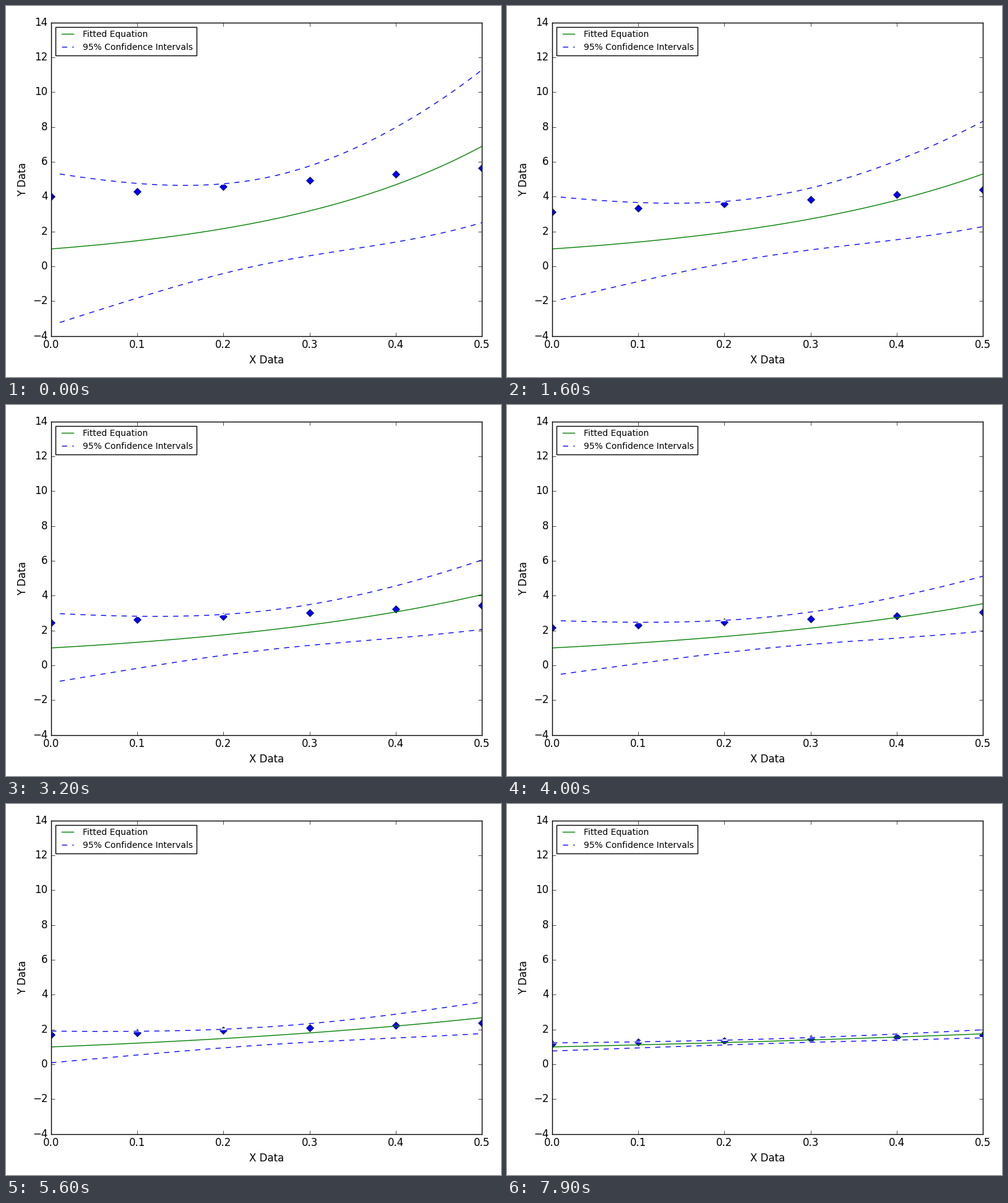
Write a matplotlib script that moves like this. It is 800x600 px and loops after 8000 ms.

```python
import numpy as np
import matplotlib.pyplot as plt
from matplotlib.animation import FuncAnimation

FRAMES = 80
STEP_MS = 100
T_95 = 2.5706  # two-sided 95 %, five degrees of freedom

plt.style.use("classic")
plt.rcParams.update({
    "font.family": "DejaVu Sans",
    "figure.facecolor": "white",
    "savefig.facecolor": "white",
    "savefig.dpi": 100,
})

x_data = np.linspace(0, 0.5, 6)
x_model = np.linspace(0, 0.5, 51)


def fit_rate(y):
    """Least-squares rate b of exp(b * x), by Gauss-Newton steps."""
    b = 2.0
    for _ in range(60):
        f = np.exp(b * x_data)
        slope = x_data * f
        b += slope @ (y - f) / (slope @ slope)
    return b


def half_width(residuals):
    """Half width of the confidence band along x_model."""
    mean = x_data.mean()
    spread = np.sum((x_data - mean) ** 2)
    error = np.sqrt(residuals @ residuals / (len(x_data) - 1))
    return T_95 * error * np.sqrt(1 / len(x_data) + (x_model - mean) ** 2 / spread)


fig = plt.figure(figsize=(8, 6), dpi=100)
ax = fig.add_axes([73 / 800, 66.3 / 600, 696 / 800, 507 / 600])
ax.set_xlim(0, 0.5)
ax.set_ylim(-4, 14)
ax.set_xticks(np.arange(6) / 10)
ax.set_yticks(np.arange(-4, 15, 2))
ax.set_xlabel("X Data")
ax.set_ylabel("Y Data")

points, = ax.plot([], [], "D", color="blue", markeredgecolor="black")
curve, = ax.plot([], [], color="green", label="Fitted Equation")


def band_line(label=None):
    """A dashed line on a white backing."""
    back, = ax.plot([], [], color="white", lw=2)
    dash, = ax.plot([], [], color="blue", ls="--", label=label)
    return back, dash


lower = band_line("95% Confidence Intervals")
upper = band_line()
ax.legend(loc="upper left", fontsize="small")


def draw(i):
    y = 2 ** (x_data + 2 - i / 45)
    b = fit_rate(y)
    fit = np.exp(b * x_model)
    half = half_width(y - np.exp(b * x_data))
    points.set_data(x_data, y)
    curve.set_data(x_model, fit)

    # a wide band leaves out its first point
    first = 1 if fit[0] - half[0] < 0.04 else 0
    for lines, edge in ((lower, fit - half), (upper, fit + half)):
        for line in lines:
            line.set_data(x_model[first:], edge[first:])
    return points, curve, *lower, *upper


anim = FuncAnimation(fig, draw, frames=FRAMES, interval=STEP_MS,
                     repeat=True, repeat_delay=0, blit=False)
plt.show()
```
